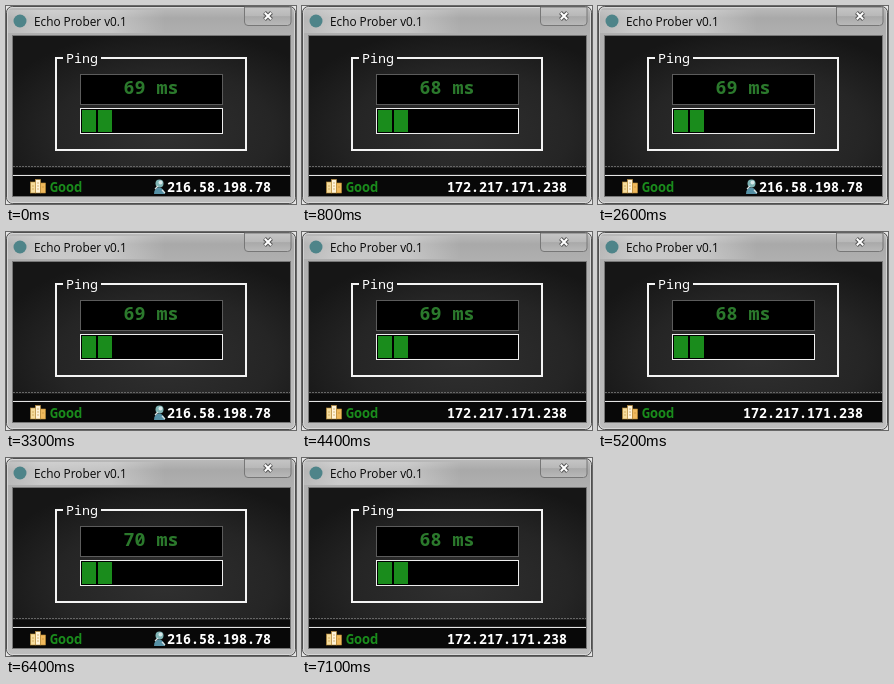
These frames come from a looping animation (290 px wide and 198 px high, 7.2 s). An HTML page:

```html
<!DOCTYPE html>
<html lang="en">
<head>
<meta charset="utf-8">
<title>Echo Prober</title>
<style>
html, body { margin: 0; width: 100%; height: 100%; overflow: hidden; background: #b5b5b5; }
svg { display: block; width: 290px; height: 198px; }
text { white-space: pre; }
.title { font: 11.8px "Open Sans", "Noto Sans", sans-serif; fill: #080808; }
.mono { font: 13.33px "Noto Sans Mono", "DejaVu Sans Mono", monospace; }
.strong { font-weight: 600; }
#reading { font-size: 18.33px; font-weight: 600; }
</style>
</head>
<body>
<svg viewBox="0 0 290 198" xmlns="http://www.w3.org/2000/svg">
  <defs>
    <linearGradient id="chrome" x2="0" y2="1">
      <stop offset="0" stop-color="#bcbcbc"/>
      <stop offset=".06" stop-color="#a9a9a9"/>
      <stop offset=".15" stop-color="#b0b0b0"/>
      <stop offset="1" stop-color="#bebebe"/>
    </linearGradient>
    <linearGradient id="glow">
      <stop offset="0" stop-color="#fff" stop-opacity=".15"/>
      <stop offset=".12" stop-color="#fff" stop-opacity=".35"/>
      <stop offset=".36" stop-color="#fff" stop-opacity=".3"/>
      <stop offset=".55" stop-color="#fff" stop-opacity="0"/>
    </linearGradient>
    <linearGradient id="button" x2="0" y2="1">
      <stop offset="0" stop-color="#c6c6c6"/>
      <stop offset=".48" stop-color="#b8b8b8"/>
      <stop offset=".52" stop-color="#a9a9a9"/>
      <stop offset="1" stop-color="#b9b9b9"/>
    </linearGradient>
    <radialGradient id="leather" cx=".55" cy=".6" r=".65">
      <stop offset="0" stop-color="#303030"/>
      <stop offset=".6" stop-color="#252525"/>
      <stop offset="1" stop-color="#161616"/>
    </radialGradient>
  </defs>

  <rect width="290" height="198" fill="#e6e6e6"/>
  <rect x=".5" y=".5" width="289" height="197" rx="6" fill="url(#chrome)" stroke="#4f4f4f"/>
  <rect x="1.5" y="1.5" width="287" height="195" rx="5" fill="none" stroke="#e4e4e4" stroke-opacity=".7"/>
  <rect x="2" y="4" width="286" height="23" fill="url(#glow)"/>
  <circle cx="14" cy="15" r="6.5" fill="#4e8489"/>
  <text class="title" x="28" y="19.500">Echo Prober v0.1</text>

  <path d="M238.5 1V16q0 3.500 3.500 3.500H281.500q3.500 0 3.500 -3.500V1z" fill="url(#button)" stroke="#777"/>
  <path d="M258.500 6.500l7 7M265.500 6.500l-7 7" stroke="#555" stroke-width="4"/>
  <path d="M258.800 6.800l6.400 6.400M265.200 6.800l-6.400 6.400" stroke="#fff" stroke-width="2"/>

  <rect x="6.5" y="29.5" width="278" height="161" fill="#111" stroke="#777"/>
  <rect x="7" y="30" width="277" height="160" fill="url(#leather)"/>
  <rect x="7" y="162" width="277" height="6" fill="#0c0c0c"/>
  <path d="M7 160.5H284" stroke="#666" stroke-dasharray="2 1"/>
  <path d="M7 169.5H284" stroke="#e4e4e4"/>
  <rect x="7" y="170" width="277" height="20" fill="#080808"/>

  <path d="M57 52H50V144H240V52H95" fill="none" stroke="#f4f4f4" stroke-width="2"/>
  <text class="mono" x="60" y="57" fill="#fff">Ping</text>
  <rect x="74.5" y="68.5" width="142" height="30" fill="#000" stroke="#5c5c5c"/>
  <rect x="74.5" y="102.5" width="142" height="25" fill="#000" stroke="#eee"/>
  <text id="reading" class="mono" x="145" y="88" text-anchor="middle"></text>
  <g id="bar"></g>

  <g stroke="#b98a35" stroke-width=".6">
    <rect x="24.5" y="176" width="5" height="11" fill="#f6dc9c"/>
    <rect x="29.5" y="173.5" width="5" height="13.5" fill="#fff3d8"/>
    <rect x="34.5" y="177" width="5" height="10" fill="#f0b95c"/>
    <path d="M26 180h2M26 183h2M31 177h2M31 180h2M31 183h2M36 181h2" fill="none"/>
  </g>
  <text id="status" class="mono strong" x="44" y="186"></text>
  <g id="host">
    <circle cx="153.5" cy="177.5" r="4" fill="#7fb5b5"/>
    <circle cx="154.5" cy="176.5" r="2" fill="#d5e8ea"/>
    <path d="M148 188q0 -6 5 -6.500q5 .5 6 6.500z" fill="#5590a5"/>
    <path d="M149 183l3 -3M156 184l3 3" stroke="#d8e2e3" stroke-width="1.3"/>
  </g>
  <text id="address" class="mono strong" x="265" y="186" fill="#fff" text-anchor="end"></text>
</svg>
<script>
const LOOP = 7200;
const HOSTS = ["216.58.198.78", "172.217.171.238"];

// start time, delay in ms, host index
const STEPS = [
  [0, 69, 0], [400, 70, 0], [700, 68, 1], [1100, 69, 0],
  [1500, 153, 0], [1700, 68, 1], [2000, 69, 0], [2800, 68, 1],
  [3200, 69, 0], [3600, 68, 0], [4000, 70, 0], [4400, 69, 1],
  [4900, 68, 1], [5700, 70, 0], [6600, 69, 1], [6800, 70, 0],
  [7000, 68, 1]
];

const GOOD = { label: "Good", text: "#2b792c", fill: "#1a8c1c" };
const MEDIUM = { label: "Medium", text: "#ffff00", fill: "#ffff00" };

const get = id => document.getElementById(id);
const reading = get("reading"), status = get("status");
const bar = get("bar"), host = get("host"), address = get("address");

const blocks = Array.from({ length: 9 }, (_, i) => {
  const block = document.createElementNS("http://www.w3.org/2000/svg", "rect");
  const box = { x: 76 + i * 16, y: 104, width: 14, height: 22 };
  for (const key in box) block.setAttribute(key, box[key]);
  return bar.appendChild(block);
});

function show([, delay, index]) {
  const level = delay < 100 ? GOOD : MEDIUM;
  reading.textContent = delay + " ms";
  reading.setAttribute("fill", level.text);
  status.textContent = level.label;
  status.setAttribute("fill", level.fill);
  bar.setAttribute("fill", level.fill);
  const count = Math.floor(delay / 30);
  blocks.forEach((block, i) => block.style.display = i < count ? "" : "none");
  address.textContent = HOSTS[index];
  // The longer address covers the host icon.
  host.style.display = index ? "none" : "";
}

const start = performance.now();
let current;

function tick() {
  const time = (performance.now() - start) % LOOP;
  const step = STEPS.findLast(s => s[0] <= time);
  if (step !== current) show(current = step);
  requestAnimationFrame(tick);
}
tick();
</script>
</body>
</html>
```
